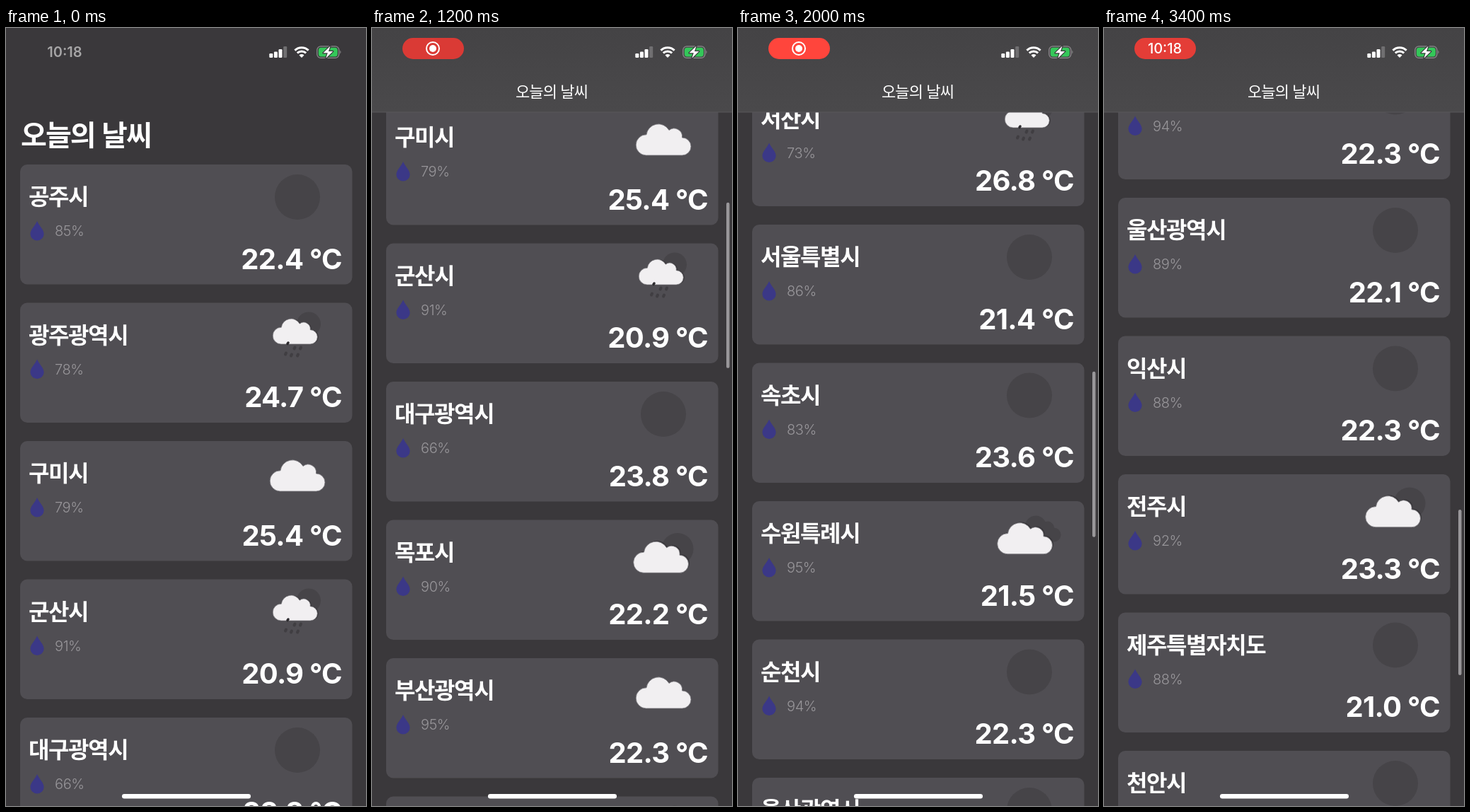
Write an HTML page that moves like this. It is 509 px wide and 1100 px high and loops after 3500 ms.

```html
<!DOCTYPE html>
<html lang="ko">
<head>
<meta charset="utf-8">
<style>
  html, body { margin: 0; width: 100%; height: 100%; overflow: hidden; background: #3a383b; }
  svg { display: block; }
  text { fill: #fff; font-family: Inter, "Noto Sans CJK KR", "Noto Sans CJK", sans-serif; }
  .ko { font-family: "Noto Sans CJK KR", "Noto Sans CJK", sans-serif; }
  .large { font-size: 40px; font-weight: 700; letter-spacing: -1.9px; }
  .small { font-size: 22px; font-weight: 500; letter-spacing: -.9px; text-anchor: middle; }
  .city { font-size: 32px; font-weight: 600; letter-spacing: -1.4px; }
  .humidity { font-size: 20px; font-weight: 300; letter-spacing: -.4px; fill: #98969a; }
  .temp { font-size: 40px; font-weight: 700; letter-spacing: -.7px; text-anchor: end; }
  .time { font-size: 20px; text-anchor: middle; }
</style>
</head>
<body>
<svg width="509" height="1100" viewBox="0 0 509 1100">
  <defs>
    <clipPath id="below"><rect y="119" width="509" height="981"/></clipPath>
    <linearGradient id="bar" x2="0" y2="1">
      <stop stop-color="#444345"/><stop offset="1" stop-color="#4a494b"/>
    </linearGradient>
    <path id="shape" d="M387.5 71A14.6 14.6 0 0 1 388 41.8A17.2 17.2 0 0 1 420 35.5A11.5 11.5 0 0 1 438.5 46A12.5 12.5 0 0 1 438.5 71Z"/>
    <use id="cloud" href="#shape" fill="#f1eff1" stroke="#77757a" stroke-width=".8"/>
    <path id="drop" fill="#3b3887" d="M44 80C47 87 53.6 92 53.6 98.3A9.6 9.2 0 0 1 34.4 98.3C34.4 92 41 87 44 80Z"/>
    <g id="clear"><circle cx="412" cy="46" r="32" fill="#464448"/></g>
    <g id="cloudy"><use href="#cloud"/></g>
    <g id="partly">
      <circle cx="432" cy="41" r="22.5" fill="#464448"/>
      <use href="#shape" x="-2" y="2.5" fill="#38363a"/>
      <use href="#cloud" x="-3.5" y="3.8"/>
    </g>
    <g id="broken">
      <path fill="#464448" d="M406 36A15 15 0 0 1 434.5 29A9.5 9.5 0 0 1 447 37.5A10 10 0 0 1 446 57.5H412Z"/>
      <use href="#shape" x="-5" y="2.5" fill="#38363a"/>
      <use href="#cloud" x="-6.5" y="3.8"/>
    </g>
    <g id="rain">
      <circle cx="428" cy="30" r="17" fill="#464448"/>
      <path stroke="#403e42" stroke-width="4" stroke-linecap="round" d="M408.5 63l-1 2M417 63l-1 2M396 71l-1 2M404 73l-1 2M413 73l-1 2"/>
      <use href="#shape" transform="translate(76.5 .8) scale(.81)" fill="#38363a"/>
      <use href="#cloud" transform="translate(75 .9) scale(.81)"/>
      <path stroke="#2c2a2e" stroke-width="3.5" stroke-linecap="round" d="M399 56.5l-1 1.5"/>
    </g>
  </defs>

  <g clip-path="url(#below)">
    <g id="list"><text class="ko large" x="21" y="166">오늘의 날씨</text></g>
  </g>
  <g id="nav">
    <rect width="509" height="119" fill="url(#bar)"/>
    <path d="M0 119H509" stroke="#59575a"/>
    <text class="ko small" x="254" y="98">오늘의 날씨</text>
  </g>
  <rect id="scrollbar" x="501" width="4.5" height="234" rx="2.2" fill="#99979a"/>

  <text id="clock" class="time" x="83" y="41" font-weight="600">10:18</text>
  <g id="pill">
    <rect id="pillBack" x="43" y="14" width="87" height="30" rx="15"/>
    <g id="record">
      <circle cx="86" cy="29" r="9" fill="none" stroke="#fff" stroke-width="2"/>
      <circle cx="86" cy="29" r="5" fill="#fff"/>
    </g>
    <text id="pillTime" class="time" x="86" y="36" font-weight="500">10:18</text>
  </g>

  <g fill="#fff">
    <rect x="372.3" y="36" width="5" height="6" rx="1.3"/>
    <rect x="378.9" y="33.5" width="5" height="8.5" rx="1.3"/>
    <rect x="385.5" y="30" width="5" height="12" rx="1.3"/>
    <rect x="392.2" y="26" width="5" height="16" rx="1.3" fill="#706f71"/>
    <path d="M418 42l-3.5-3.6a5 5 0 0 1 7 0Z"/>
    <path d="M411.8 35.4a9 9 0 0 1 12.4 0M408.4 31.6a13.8 13.8 0 0 1 19.2 0" fill="none" stroke="#fff" stroke-width="3"/>
  </g>
  <rect x="439.8" y="25.8" width="31" height="16.6" rx="5.3" fill="none" stroke="#8c8b8d" stroke-width="1.3"/>
  <rect x="441.8" y="27.8" width="27" height="12.6" rx="3.6" fill="#34c759"/>
  <path d="M472.4 31.5q2.2 2.5 0 5Z" fill="#8c8b8d"/>
  <path d="M458.5 25.5L448.5 35.3H454.8L452.3 42.8L462.3 33H456Z" fill="#fff" stroke="#3a383b" stroke-width="2.4" paint-order="stroke" stroke-linejoin="round"/>
  <rect x="164" y="1083" width="182" height="6.5" rx="3.2" fill="#fff"/>
</svg>
<script>
const LOOP = 3500, STEP = 100;
const cities = [
  ['공주시', 85, '22.4', 'clear'], ['광주광역시', 78, '24.7', 'rain'],
  ['구미시', 79, '25.4', 'cloudy'], ['군산시', 91, '20.9', 'rain'],
  ['대구광역시', 66, '23.8', 'clear'], ['목포시', 90, '22.2', 'partly'],
  ['부산광역시', 95, '22.3', 'cloudy'], ['서산시', 73, '26.8', 'rain'],
  ['서울특별시', 86, '21.4', 'clear'], ['속초시', 83, '23.6', 'clear'],
  ['수원특례시', 95, '21.5', 'broken'], ['순천시', 94, '22.3', 'clear'],
  ['울산광역시', 89, '22.1', 'clear'], ['익산시', 88, '22.3', 'clear'],
  ['전주시', 92, '23.3', 'partly'], ['제주특별자치도', 88, '21.0', 'clear'],
  ['천안시', 90, '22.0', 'clear'],
];
const scrollKeys = [[0, 0], [600, 0], [900, 278], [1200, 475], [1500, 824],
  [2000, 1479], [2500, 2050], [3100, 2299], [3500, 2299]];

const $ = id => document.getElementById(id);
const ramp = (t, from, to) => Math.min(1, Math.max(0, (t - from) / (to - from)));
const fade = (id, opacity) => $(id).setAttribute('opacity', opacity);

$('list').innerHTML += cities.map(([name, humidity, temp, icon], i) => `
  <g transform="translate(0 ${193 + 195.5 * i})">
    <rect x="20" width="469.5" height="169.5" rx="10" fill="#504e53"/>
    <text class="ko city" x="32" y="57">${name}</text>
    <use href="#drop"/>
    <text class="humidity" x="69" y="101">${humidity}%</text>
    <text class="temp" x="475" y="147.5">${temp} °C</text>
    <use href="#${icon}"/>
  </g>`).join('');

// Smooth cubic through the scroll keys, at rest on both ends
function scrollAt(t) {
  const k = scrollKeys, last = k.length - 2;
  const i = Math.max(0, k.findIndex(([time]) => time > t) - 1);
  const slope = j => j <= 1 || j >= last ? 0
    : (k[j + 1][1] - k[j - 1][1]) / (k[j + 1][0] - k[j - 1][0]);
  const [[t0, a], [t1, b]] = [k[i], k[i + 1]];
  const d = t1 - t0, u = (t - t0) / d, v = 1 - u;
  return a * v * v * (1 + 2 * u) + b * u * u * (3 - 2 * u)
    + d * u * v * (slope(i) * v - slope(i + 1) * u);
}

function draw(now) {
  const t = Math.floor(now % LOOP / STEP) * STEP;
  const y = scrollAt(t);
  $('list').setAttribute('transform', `translate(0 ${-y})`);
  fade('nav', ramp(y, 45, 70));
  $('scrollbar').setAttribute('y', 133.8 + .238 * y);
  fade('scrollbar', y > 0 ? 1 : 0);

  fade('clock', .55 * (1 - ramp(t, 0, 200)));
  const grow = ramp(t, 0, 300), scale = .6 + .4 * grow;
  fade('pill', grow);
  $('pill').setAttribute('transform', `translate(86.5 29) scale(${scale}) translate(-86.5 -29)`);
  const glow = .5 - .5 * Math.cos((t - 1000) / 1000 * Math.PI);
  $('pillBack').setAttribute('fill', `rgb(${214 + 41 * glow} ${57 + 12 * glow} ${52 + 8 * glow})`);
  const swap = ramp(t, 3000, 3300);
  fade('record', 1 - swap);
  fade('pillTime', swap);
  requestAnimationFrame(() => draw(performance.now()));
}
draw(performance.now());
</script>
</body>
</html>
```
